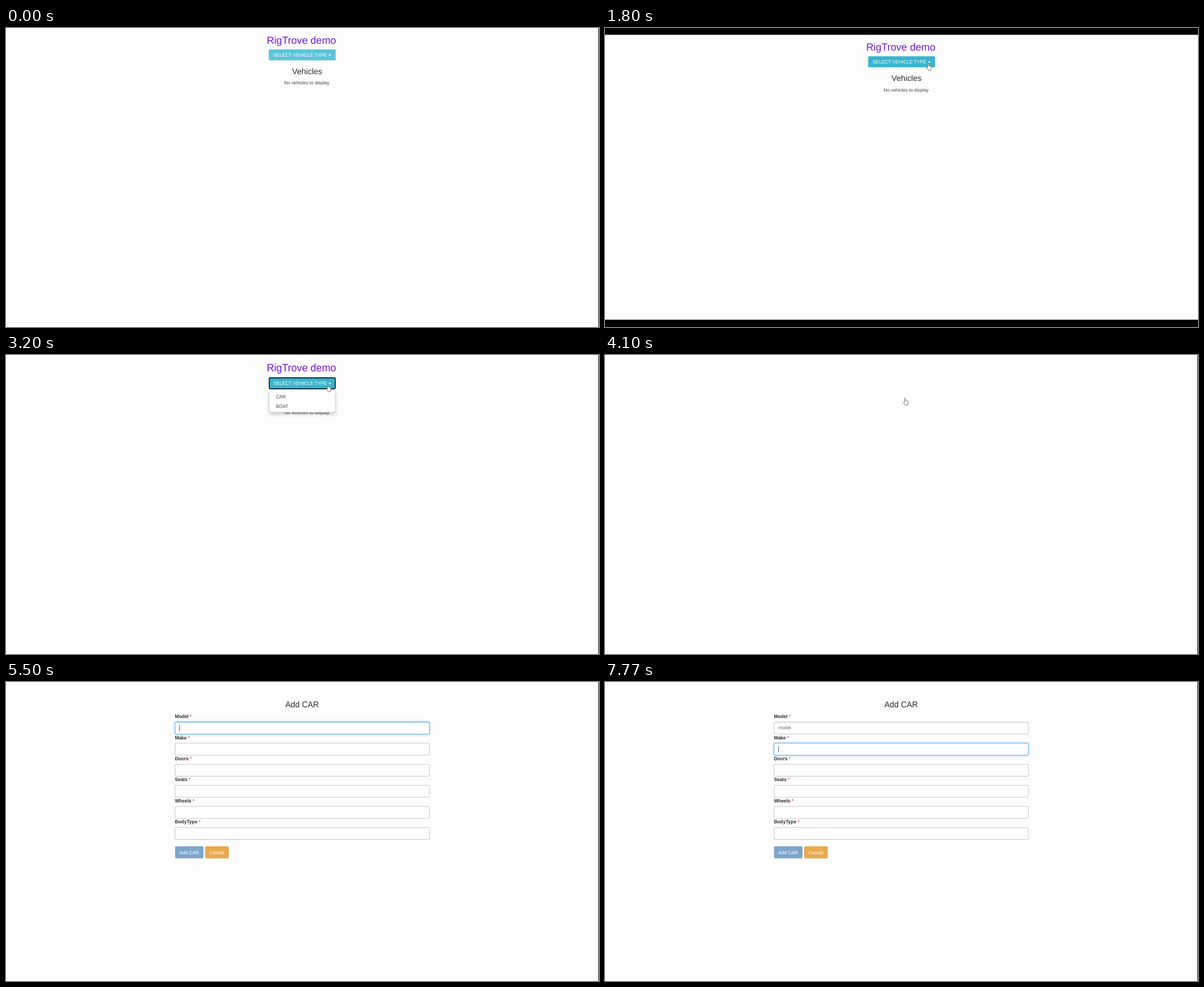
Recreate the animation shown at these times as an HTML page. Size 1054 by 531 pixels, loop 8 s.

```html
<!DOCTYPE html>
<html lang="en">
<head>
<meta charset="utf-8">
<title>RigTrove demo</title>
<style>
  html, body { margin: 0; width: 100%; height: 100%; overflow: hidden; background: #fdfdfd; }
  svg { display: block; width: 1054px; height: 531px; }
  text { font-family: "Liberation Sans", Arial, sans-serif; font-size: 8.3px; fill: #444; text-rendering: geometricPrecision; white-space: pre; }
  .head { font-size: 14.35px; fill: #2d2d2d; text-anchor: middle; }
  .title { font-size: 18.1px; fill: #7119c8; }
  .btn { font-size: 8.4px; fill: #fff; }
  .label { font-size: 8.4px; font-weight: bold; fill: #2d2d2d; }
  .star { font-weight: normal; fill: #e02020; }
  .value { fill: #666; }
  .field { fill: #fefefe; stroke: #c9c9d2; }
  .focus { fill: #fefefe; stroke: #6fb2e8; filter: drop-shadow(0 0 2px #8cc4f0); }
  .menu { fill: #fefefe; stroke: #d2d2d2; stroke-width: .7; filter: drop-shadow(0 3px 3px rgba(0, 0, 0, .22)); }
  .pointer { fill: #fff; stroke: #45454d; stroke-width: .75; stroke-linejoin: round; }
</style>
</head>
<body>
<svg viewBox="0 0 1054 531">
  <rect width="1054" height="531" fill="#fdfdfd"/>
  <g id="page">
    <g id="home">
      <text class="title" id="title" x="463.5" y="27.9">RigTrove demo</text>
      <rect id="button" x="467" y="38" width="119" height="19.6" rx="2"/>
      <rect id="ring" x="467.8" y="38.6" width="117.4" height="18.4" rx="1.5" fill="none" stroke="#10262c" stroke-width="1.7"/>
      <text class="btn" x="475" y="50.9" style="font-size:8.45px">SELECT VEHICLE TYPE</text>
      <path d="M573 47.3h5l-2.5 2.5z" fill="#fff"/>
      <text class="head" x="535.3" y="82.3">Vehicles</text>
      <text x="494.5" y="100.4">No vehicles to display</text>
      <g id="menu">
        <rect class="menu" x="467.7" y="59.6" width="117.2" height="37.2" rx="1.5"/>
        <rect id="item" x="468.2" y="62.8" width="116.2" height="15.6" fill="#f3f3f3"/>
        <text x="479.7" y="73">CAR</text>
        <text x="479.7" y="89.2">BOAT</text>
      </g>
    </g>
    <g id="form">
      <text class="head" x="526.3" y="43.2">Add CAR</text>
      <g id="fields"></g>
      <rect x="300.5" y="278" width="50.5" height="20.4" rx="2" fill="#7da5cb"/>
      <text class="btn" x="308" y="291.2">Add CAR</text>
      <rect x="354" y="278" width="42" height="20.4" rx="2" fill="#e9a94e"/>
      <text class="btn" x="361.7" y="291.2">Cancel</text>
      <text class="value" id="value" x="308" y="80.3"></text>
      <rect id="caret" width=".9" height="10.4" fill="#444"/>
    </g>
  </g>
  <path id="bars" d="M0 0h1054v12H0zM0 518h1054v13H0z"/>
  <rect id="edge" x="1053" width="1" height="531"/>
  <g id="cursor" class="pointer">
    <path id="arrow" d="M.5.5v9l2-1.9 1.3 3 1.3-.6-1.3-2.9h2.7z"/>
    <path id="hand" d="M2.6 7V1.5a.95.95 0 0 1 1.9 0V5l3 .6q1.2.3 1.2 1.6v2.3l-1 3.5H3.6L.6 8.6Q.5 7 2.6 8z"/>
  </g>
</svg>
<script>
const LOOP = 8000;
const STRETCH = 531 / 506;
const PITCH = 35.65;
const LABELS = ['Model', 'Make', 'Doors', 'Seats', 'Wheels', 'BodyType'];

// time, x, y of the pointer
const PATH = [
  [400, 624, 306], [800, 602, 130], [970, 578, 38], [1130, 594, 40],
  [1230, 592, 86], [1370, 571, 61], [1799, 571, 61], [1800, 571, 62],
  [3199, 571, 62], [3200, 569, 52], [3470, 530, 76]
];
// time and number of typed letters
const TYPED = [[6370, 1], [6630, 2], [6870, 3], [6970, 4], [7170, 5]];

const $ = id => document.getElementById(id);
const show = (id, on) => { $(id).style.display = on ? '' : 'none'; };
const within = (t, a, b) => t >= a && t < b;
const ramp = (t, a, b) => Math.min(1, Math.max(0, (t - a) / (b - a)));

$('fields').innerHTML = LABELS.map((name, i) => {
  const y = 68 + i * PITCH;
  const box = `x="300.5" y="${y}" width="452" height="20.2" rx="2"`;
  return `<rect class="field" ${box}/><rect class="focus" ${box} opacity="0"/>` +
    `<text class="label" x="300.2" y="${61.1 + i * PITCH}">${name} <tspan class="star">*</tspan></text>`;
}).join('');
const focus = document.querySelectorAll('.focus');

function pointerAt(t) {
  const now = Math.floor(t / 66.6 + .01) * 66.6;
  // hard jumps keep the exact time, moves advance in ticks
  const clock = within(t, 1370, 3270) ? t : now;
  const next = PATH.findIndex(p => p[0] > clock);
  if (next === 0) return PATH[0].slice(1);
  if (next < 0) return PATH[PATH.length - 1].slice(1);
  const [a, b] = [PATH[next - 1], PATH[next]];
  const k = ramp(clock, a[0], b[0]);
  return [a[1] + (b[1] - a[1]) * k, a[2] + (b[2] - a[2]) * k];
}

function drawPage(t) {
  const boxed = within(t, 100, 3200);
  const move = boxed ? 'translate(.7 12.2)' : t < 100 ? '' : `scale(1 ${STRETCH})`;
  $('page').setAttribute('transform', move);
  show('bars', boxed);
  show('edge', !boxed);
  show('home', t < 4100);
  show('form', t >= 4300);
}

function drawHome(t) {
  $('title').style.textDecoration = within(t, 960, 1130) ? 'underline' : '';
  $('button').setAttribute('fill', t < 1300 ? '#5dc5d8' : '#39b5ce');
  show('ring', t >= 2600);
  show('menu', t >= 2770);
  show('item', t >= 3400);
}

function drawForm(t) {
  const count = TYPED.reduce((n, [at, size]) => t >= at ? size : n, 0);
  const value = $('value');
  value.textContent = 'model'.slice(0, count);

  const onMake = t >= 7570;
  const off = within(t, 5000, 5500) || within(t, 6030, 6370);
  show('caret', t >= 4370 && !off);
  const width = count && !onMake ? value.getComputedTextLength() : 0;
  $('caret').setAttribute('x', 307.9 + width);
  $('caret').setAttribute('y', 72.6 + (onMake ? PITCH : 0));

  focus[0].setAttribute('opacity', ramp(t, 4430, 4620) * (1 - ramp(t, 7570, 7740)));
  focus[1].setAttribute('opacity', ramp(t, 7570, 7740));
}

function drawPointer(t) {
  const hand = within(t, 960, 1130) || t >= 1300;
  show('cursor', within(t, 170, 4570));
  show('arrow', !hand);
  show('hand', hand);
  $('cursor').setAttribute('transform', `translate(${pointerAt(t)})`);
}

const start = performance.now();
function tick() {
  const t = (performance.now() - start) % LOOP;
  drawPage(t);
  drawHome(t);
  drawForm(t);
  drawPointer(t);
  requestAnimationFrame(tick);
}
tick();
</script>
</body>
</html>
```
